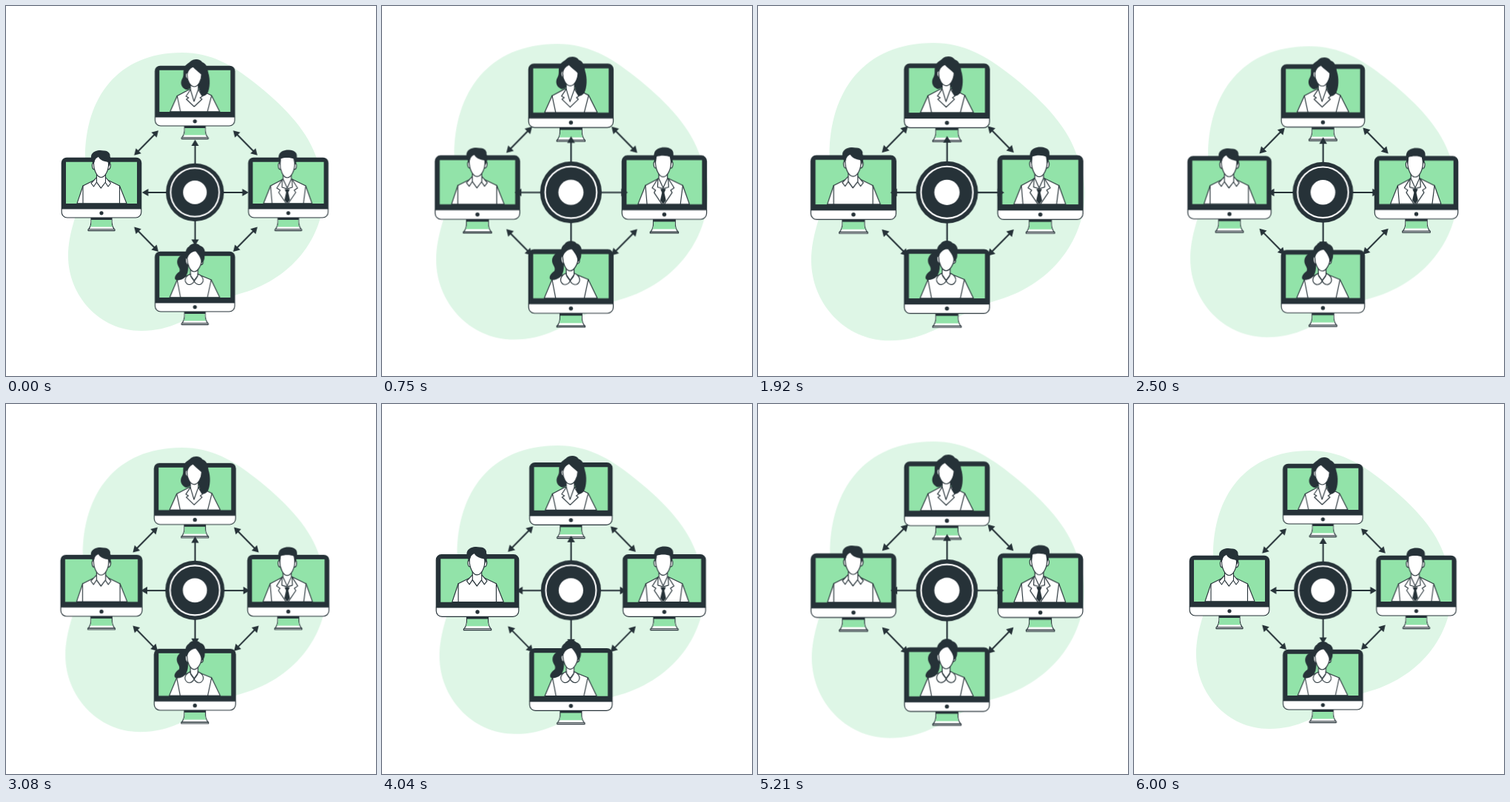
Recreate the animation shown at these times as an HTML page. Size 500x500 px, loop 6040 ms.

```html
<!DOCTYPE html>
<html lang="en">
<head>
<meta charset="utf-8">
<title>Connected desks</title>
<style>
  html, body { margin: 0; width: 100%; height: 100%; overflow: hidden; background: #fff; }
  svg { display: block; width: 100vw; height: 100vh; }
  .pulse { animation: pulse 6040ms linear infinite; }
  .blob { fill: #def6e6; transform-origin: 256px 251px; }
  .dark { fill: #263238; }
  .green { fill: #92e3a9; }
  .white { fill: #fff; }
  .ink, .line { stroke: #263238; stroke-width: 1.1; stroke-linejoin: round; stroke-linecap: round; }
  .ink { fill: #fff; }
  .line { fill: none; }
  .arrows path { fill: none; stroke: #263238; stroke-width: 2; marker-start: url(#tip); marker-end: url(#tip); }
  /* 6 s of beats, then a 40 ms rest */
  @keyframes pulse {
    0%, 59.603%, 99.338%, 100% { transform: scale(1); }
    19.868%, 79.47% { transform: scale(1.1); }
  }
</style>
</head>
<body>
<svg viewBox="0 0 500 500">
  <defs>
    <marker id="tip" markerUnits="userSpaceOnUse" markerWidth="10" markerHeight="10" refX="4" refY="0" orient="auto-start-reverse" overflow="visible">
      <path class="dark" d="M0-5L8.500 0 0 5z"/>
    </marker>

    <g id="monitor">
      <path class="ink" d="M-14 36H14V42C14 46 16 50 17.500 52H-17.500C-16 50-14 46-14 42z"/>
      <path class="green" d="M-13.500 38H13.500V42C13.500 45 14.300 47 15 48.500H-15C-14.300 47-13.500 45-13.500 42z"/>
      <path class="dark" d="M-14 36H14V39H-14z"/>
      <path class="ink" d="M-18 51.800H18V53.600H-18z"/>
      <path class="ink" d="M-53.800 24H53.800V28.500a7.500 7.500 0 0 1-7.500 7.500H-46.300a7.500 7.500 0 0 1-7.500-7.500z"/>
      <path class="dark" d="M-54.300 24V-38a7.300 7.300 0 0 1 7.300-7.300H47a7.300 7.300 0 0 1 7.300 7.300V24z"/>
      <path class="green" d="M-48-39.300H48V17H-48z"/>
      <circle class="dark" cy="29.800" r="2.600"/>
    </g>

    <g id="longHair">
      <path class="ink" d="M-33.500 16.800L-24-4.500-8-13H7L22.500-5 33.500 16.800z"/>
      <path class="line" d="M-24-4.500L-19.500 16.500M22.500-5L17 16.500"/>
      <path class="dark" d="M-5-52C-1-55 7-55 10-50C16-48 17-42 18-36C21-27 20.500-15 17-8C14-4 9-3 6-5C8-9 6-12 5-16L-6-15C-9-13-12-12-14-14C-19-17-20-23-17-28C-14-33-17-38-14-43C-13-47-9-48-5-52z"/>
      <path class="ink" d="M-6-22H4.500V-13L10-4 7-2 9.500 0-1 10-11.500 0-8.500-2-12-4-6-13z"/>
      <path class="line" d="M-6-13L-1.200 3 4.500-13"/>
      <path class="ink" d="M-9-35C-13.500-38-14-29-9.500-27"/>
      <path class="ink" d="M-10.500-33C-10-38-7-42-2.500-44C2-39 6-37 9-33.500C9-25 4-17-.8-17C-6-17-10.500-25-10.500-33z"/>
    </g>

    <g id="shirt">
      <path class="ink" d="M-33 16.800L-25-7-7-16H6L24.500-7 34 16.800z"/>
      <path class="line" d="M-25-7V16.500M24.500-7V16.500"/>
      <path class="ink" d="M-7-18L-14-10.500-10.500-6-6.500-12-.7-4 5-12 9-6 12.500-10.500 6-18"/>
      <path class="ink" d="M-6.500-26H5.500V-12L-.7-4-6.500-12z"/>
      <path class="ink" d="M-10-38C-14-39-13-29-9.500-29M9.500-38C14-39 12.500-29 9-29"/>
      <path class="ink" d="M-10.500-38L-8-47H6L9.500-38C10-28 5-18.500-.5-18.500S-10.500-28-10.500-38z"/>
      <path class="dark" d="M-10.500-35C-13-40-15.500-46-13-50C-10-54.500-3-56 3-54.500C9-55 12.500-50 11.500-47C13.500-43 12.500-38 10.500-33L9-39C3-40-2-42-4-46C-7-45-10-42-10.500-35z"/>
    </g>

    <g id="suit">
      <path class="ink" d="M-33.500 16.800L-24-7-7-16H5L23.500-7 32 16.800z"/>
      <path class="line" d="M-24-7L-22 16.500M23.500-7L20.500 16.500"/>
      <path class="ink" d="M-8-16L-15.500-4-11-1-13 2-3 16.800H0L10 2 8-1 12.500-4 5-16"/>
      <path class="ink" d="M-7-26H4V-16L-1.500-4-7-16z"/>
      <path class="line" d="M-8-16L-8.500-5-1.500-3 5.500-5 5-16"/>
      <path class="dark" d="M-5-2.500H2L0 2 2.200 12-1.500 16.800-5.200 12-3 2z"/>
      <path class="ink" d="M-11-38C-15-39-14-29-10.500-29M8-38C12.500-39 11.500-29 8-29"/>
      <path class="ink" d="M-11.300-38L-10-47H7L8.500-38C9-28 4-18-1.500-18S-11.300-28-11.300-38z"/>
      <path class="dark" d="M-11-34C-13.500-39-14-45-12.500-49C-11-54-4-56 1-55.500C8-55 11.500-52 11.500-48C12-43 11-38 8.500-34L8-43C3-45.500-5-45.500-10-43.500z"/>
    </g>

    <g id="ponytail">
      <path class="ink" d="M-34 16.800L-24-7-7-14H5L22-7 33.500 16.800z"/>
      <path class="line" d="M-24-7L-19.500 16.500M22-7L17 16.500"/>
      <path class="dark" d="M-10-43C-18-43-24-37-24-31C-24-25-19-23-21-18C-27-14-29-8-25-6.500C-19-6-13-9-11-14C-8-20-9-28-10-34z"/>
      <path class="ink" d="M-6-22H4V-13L-1-6-6-13z"/>
      <path class="ink" d="M-6-15C-11-13-14-9-13-5C-10 2-4 0-1-5C2 0 8 2 11-5C12-9 9-13 4-15C5-11 1-9-1-5C-3-9-7-11-6-15z"/>
      <path class="ink" d="M-9.500-36C-14-39-13.500-28-9-27M8-34C12-34 12-28 8-27"/>
      <path class="ink" d="M-10.500-36C-10-42-7-47-4-48H6L9-36C9.500-27 4-18-1-18S-10.500-27-10.500-36z"/>
      <path class="dark" d="M-10.500-35C-14-42-13-49-8-52C-5-57 4-57 7-53C12-52 15-46 13-40C13.500-35 12-31 8.500-29C9-34 6-40 1-45.500C-5-45-9-41-10.500-35z"/>
    </g>
  </defs>

  <path class="pulse blob" d="M238 63C277 63 306 80 335 103C372 132 405 165 418 201C425 218 429.500 234 429.500 252C429.500 312 387 371 312 390C280 400 262 416 234 428C218 435 202 439 183 439C125 439 84 390 84 338C84 305 97 280 103 250C106 236 107 220 107 205C107 125 150 63 238 63z"/>

  <g transform="translate(255.300 126)"><g class="pulse"><use href="#monitor"/><use href="#longHair"/></g></g>
  <g transform="translate(129 250)"><g class="pulse"><use href="#monitor"/><use href="#shirt"/></g></g>
  <g transform="translate(381.500 250)"><g class="pulse"><use href="#monitor"/><use href="#suit"/></g></g>
  <g transform="translate(255.300 377)"><g class="pulse"><use href="#monitor"/><use href="#ponytail"/></g></g>

  <g transform="translate(255.800 252)">
    <g class="pulse arrows">
      <path d="M-.3-67V67.500"/>
      <path d="M-67.500 0H67.500"/>
      <path d="M-53-80.500L-79.500-53.500"/>
      <path d="M54.300-80.500L80.800-53.500"/>
      <path d="M-79.500 49.800L-53 76.800"/>
      <path d="M80.800 49.800L54.300 76.800"/>
    </g>
  </g>

  <g transform="translate(255.300 251.800)">
    <g class="pulse">
      <circle class="dark" r="39.200"/>
      <circle r="32.800" fill="none" stroke="#fff" stroke-width="2"/>
      <circle class="white" r="16"/>
    </g>
  </g>
</svg>
</body>
</html>
```
